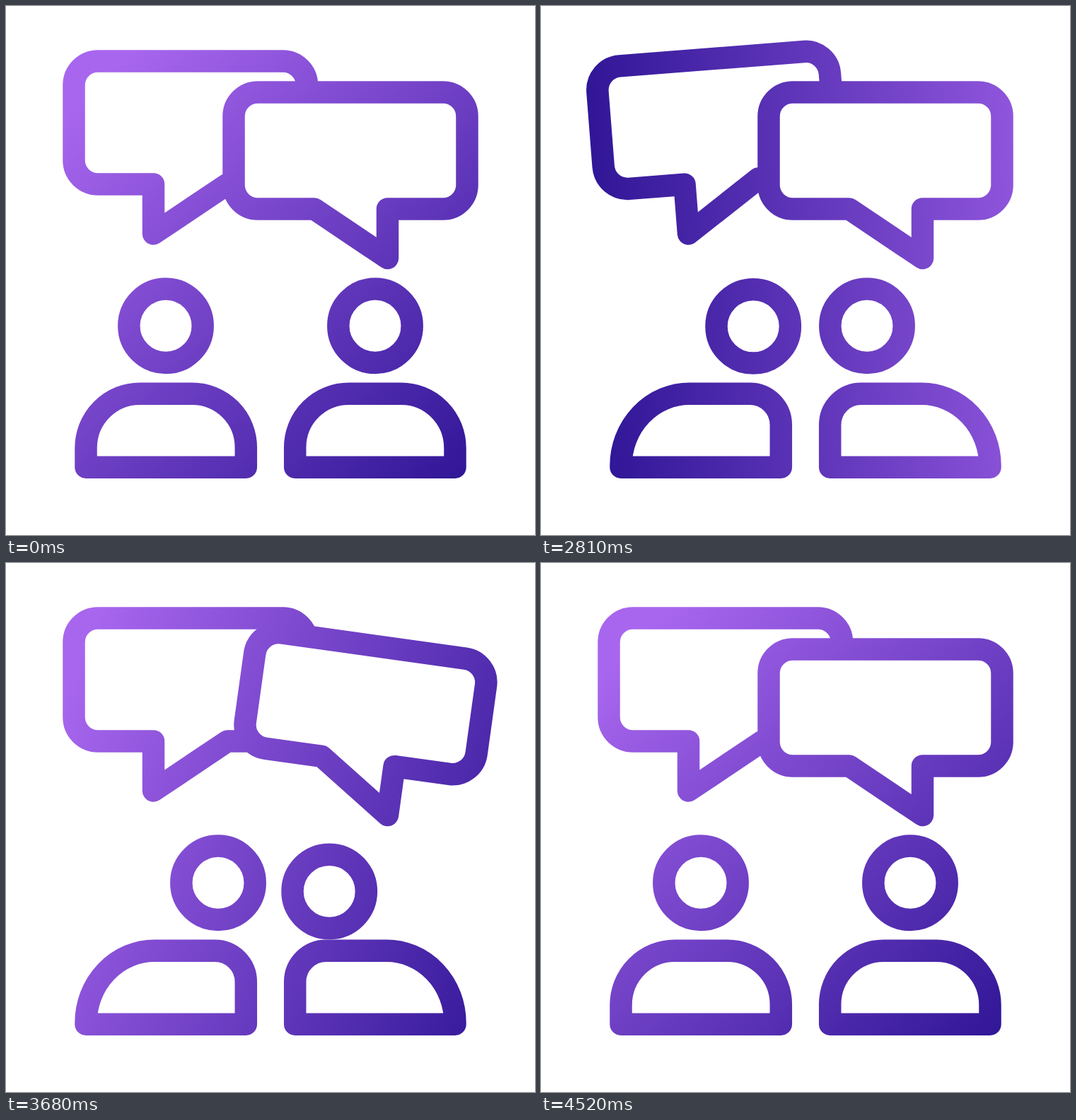
An HTML page that plays this animation: 748x748 px, repeating every 4.55 s.

```html
<!DOCTYPE html>
<html lang="en">
<head>
<meta charset="utf-8">
<title>Conversation</title>
<style>
  html, body { margin: 0; width: 100%; height: 100%; overflow: hidden; background: #fff; }
  svg { display: block; width: 100vw; height: 100vh; }
</style>
</head>
<body>
<svg viewBox="0 0 748 748">
  <defs>
    <linearGradient id="tint" gradientUnits="userSpaceOnUse" x1="39" y1="369" x2="839" y2="369">
      <stop offset="0" stop-color="#a866ee"/>
      <stop offset="1" stop-color="#2a1292"/>
    </linearGradient>
    <mask id="lines" maskUnits="userSpaceOnUse" x="0" y="0" width="748" height="748">
      <g fill="none" stroke="#fff" stroke-width="31.5" stroke-linejoin="round">
        <path id="back" d="M208.5 252H130A34 34 0 0 1 96 218V112A34 34 0 0 1 130 78H391.5A34 34 0 0 1 425.5 112V218A34 34 0 0 1 391.5 252H313L208.5 322Z"/>
        <path id="front" fill="#000" d="M539.5 287H618A34 34 0 0 0 652 253V156A34 34 0 0 0 618 122H356A34 34 0 0 0 322 156V253A34 34 0 0 0 356 287H436L539.5 356.5Z"/>
        <g id="left"><path/><circle r="52.2"/></g>
        <g id="right" transform="matrix(-1 0 0 1 748 0)"><path/><circle r="52.2"/></g>
      </g>
    </mask>
  </defs>
  <rect width="748" height="748" fill="url(#tint)" mask="url(#lines)"/>
</svg>
<script>
const LOOP = 4550, STEP = 30, HOLD = 2030;
const $ = id => document.getElementById(id);
const mix = (a, b, p) => a + (b - a) * p;
const ease = x => {
  x = Math.min(1, Math.max(0, x));
  return x * x * (3 - 2 * x);
};

// Eased value of a list of [time, value] keys.
function track(t, keys) {
  if (t <= keys[0][0]) return keys[0][1];
  for (let i = 1; i < keys.length; i++) {
    const [t0, v0] = keys[i - 1], [t1, v1] = keys[i];
    if (t < t1) return mix(v0, v1, ease((t - t0) / (t1 - t0)));
  }
  return keys[keys.length - 1][1];
}

const SWING = [[0, 0], [245, -20.7], [490, 14.7], [735, -8.8], [980, 5.6], [1135, 0]];
const SQUASH = [[0, 0], [120, 1], [250, -0.8], [400, 0]];
const TURN = 366, NOD = 334;

const people = [
  { el: $("left"), travel: 74, turnIn: 1990, turnOut: 4040, nods: [2790, 3300] },
  { el: $("right"), travel: 61, turnIn: 2010, turnOut: 3836, nods: [3450] }
];

const nodAt = x => x > 0 && x < 1 ? Math.sin(Math.PI * x) ** 2 : 0;

function drawPerson(p, t) {
  const [body, head] = p.el.children;
  const turn = ease((t - p.turnIn) / TURN) - ease((t - p.turnOut) / TURN);
  const k = track(t - p.turnIn, SQUASH) + track(t - p.turnOut, SQUASH);
  const nod = p.nods.reduce((sum, start) => sum + nodAt((t - start) / NOD), 0);
  const sx = 1 + 0.043 * k, sy = 1 - 0.04 * k;

  // Outer shoulder widens and inner shoulder tightens as the person turns.
  const ax = mix(76, 97, turn), ay = mix(77, 102, turn), b = mix(76, 44, turn);
  body.setAttribute("d",
    `M113 652.2V${548.2 + ay}A${ax} ${ay} 0 0 1 ${113 + ax} 548.2` +
    `H${339.3 - b}A${b} ${b} 0 0 1 339.3 ${548.2 + b}V652.2Z`);
  body.setAttribute("transform", `translate(226 668) scale(${sx} ${sy}) translate(-226 -668)`);

  const dip = k > 0 ? 38 * k * k : 6 * k;
  const x = 226 + p.travel * turn + 5.5 * nod;
  const y = 452.3 + dip + 17.5 * nod;
  head.setAttribute("transform", `translate(${x} ${y}) scale(${sx} ${sy})`);
}

function draw(time) {
  let t = time % LOOP;
  t = t < HOLD ? 0 : HOLD + STEP * Math.floor((t - HOLD) / STEP);

  $("back").setAttribute("transform", `rotate(${track(t - 1986, SWING)} 208.5 322)`);
  $("front").setAttribute("transform", `rotate(${track(t - 3103, SWING)} 539.5 356.5)`);
  people.forEach(p => drawPerson(p, t));

  const angle = 45 + 360 * ease((t - 1990) / 2000);
  $("tint").setAttribute("gradientTransform", `rotate(${angle} 439 369)`);
}

let start;
function tick(now) {
  if (start === undefined) start = now;
  draw(now - start);
  requestAnimationFrame(tick);
}
draw(0);
requestAnimationFrame(tick);
</script>
</body>
</html>
```
